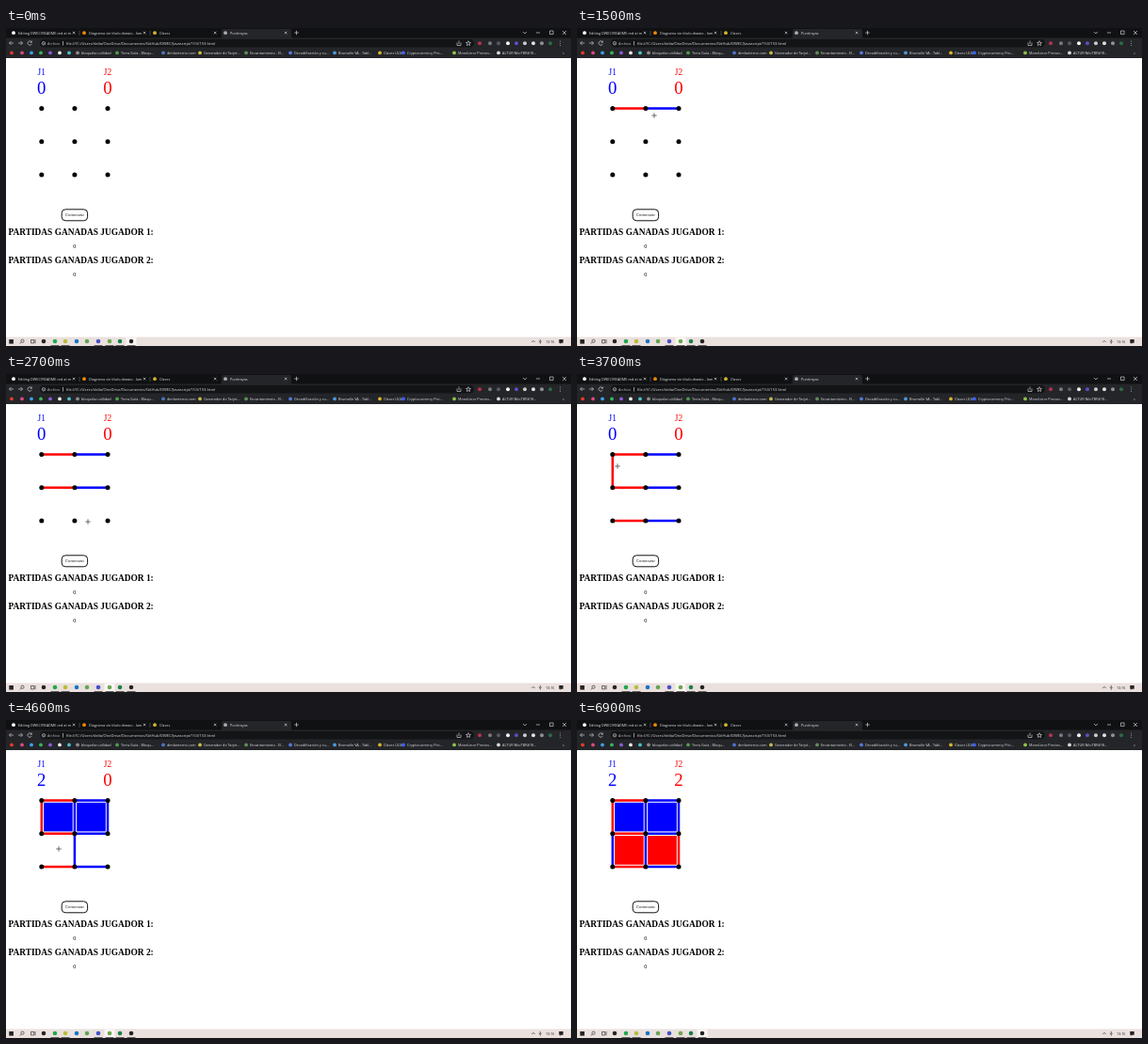
Write an HTML page that moves like this. It is 600 px wide and 338 px high and loops after 7000 ms.

```html
<!DOCTYPE html>
<html lang="es">
<head>
<meta charset="utf-8">
<title>Puntirayas</title>
<style>
  html, body { margin: 0; width: 100%; height: 100%; overflow: hidden; background: #fff; }
  svg { display: block; width: 100vw; height: 100vh; }
  .ui { font-family: "Open Sans", "Noto Sans", sans-serif; font-size: 3.8px; fill: #dfe1e4; }
  .page { font-family: "Liberation Serif", "Times New Roman", serif; font-size: 6.25px; text-anchor: middle; }
  .page .head { font-size: 9.375px; font-weight: bold; text-anchor: start; }
  .page .name { font-size: 9.375px; }
  .page .score { font-size: 18.75px; }
  .button { font: 4.4px "Liberation Sans", Arial, sans-serif; fill: #222; }
  .icon { fill: none; stroke: #c9cbcf; stroke-width: .7; }
  .dark { fill: none; stroke: #333; stroke-width: .7; }
  .blue { fill: #00f; }
  .red { fill: #f00; }
  #cursor { mix-blend-mode: difference; stroke: #fff; stroke-width: .9; opacity: .65; }
</style>
</head>
<body>
<svg viewBox="0 0 600 338" preserveAspectRatio="none">
  <rect width="600" height="338" fill="#fff"/>

  <g class="ui">
    <rect width="600" height="11" fill="#101113"/>
    <rect y="10.5" width="600" height="21.5" fill="#242528"/>
    <path d="M227 11q2 0 2-2V3q0-2 2-2h70q2 0 2 2v6q0 2 2 2z" fill="#242528"/>
    <rect x="36" y="12" width="461" height="8.6" rx="4.3" fill="#131416"/>
    <g id="tabs"></g>
    <path class="icon" d="M78 3v5M153 3v5" opacity=".4"/>
    <path class="icon" d="M306.300 5h4.400M308.500 2.800v4.400M549 4l2 2 2-2M563 5h4M577.500 3h3.600v3.600h-3.600zM591 3l4 4M595 3l-4 4"/>
    <path class="icon" d="M8 16H3.500M5.500 14l-2 2 2 2M13 16h4.500M15.500 14l2 2-2 2M27 14.700a2.200 2.200 0 1 0 .3 2.200M27.300 13.500v1.800h-1.800"/>
    <circle class="icon" cx="40" cy="16.300" r="1.700"/>
    <path class="icon" d="M40 16v1.200M60.500 14v4.500"/>
    <text x="44" y="17.800" fill="#bbb">Archivo</text>
    <text x="64" y="17.800" font-size="4.100">file:///C:/Users/delia/OneDrive/Documentos/GitHub/DWEC/Javascript/153/153.html</text>
    <path class="icon" d="M479 15.500v3h4v-3M481 17v-3.500M491 13.700l.7 1.700 1.800.1-1.400 1.200.5 1.800-1.600-1-1.600 1 .5-1.800-1.400-1.200 1.800-.1z"/>
    <g id="tools"></g>
    <path class="icon" d="M588.500 13.600v.9M588.500 15.800v.9M588.500 18v.9"/>
    <g id="marks"></g>
    <text x="591" y="28">»</text>
  </g>

  <g class="page">
    <text class="name blue" x="37.700" y="50">J1</text>
    <text class="name red" x="108" y="50">J2</text>
    <text class="score blue" id="score1" x="37.700" y="70.300">0</text>
    <text class="score red" id="score2" x="108" y="70.300">0</text>
    <g id="boxes"></g>
    <g id="lines" stroke-width="2.500"></g>
    <g id="dots"></g>
    <rect x="59.200" y="192.800" width="27.400" height="12" rx="4" fill="#fff" stroke="#111" stroke-width="1"/>
    <text class="button" x="72.900" y="200.400">Comenzar</text>
    <text class="head" x="2.500" y="219.800">PARTIDAS GANADAS JUGADOR 1:</text>
    <text x="72.800" y="233.900">0</text>
    <text class="head" x="2.500" y="250.200">PARTIDAS GANADAS JUGADOR 2:</text>
    <text x="72.800" y="264.200">0</text>
  </g>

  <g class="ui">
    <rect y="328.500" width="600" height="9.500" fill="#eae0dd"/>
    <rect id="active" y="328.500" width="11" height="9.500" fill="#faf5f3"/>
    <rect x="3.300" y="331" width="4.600" height="4.600" fill="#222"/>
    <circle class="dark" cx="17.500" cy="332.700" r="1.600"/>
    <path class="dark" d="M16.300 333.900l-1.500 1.600M26.500 331.500h3.200v3.400h-3.200zM31 331v4.300"/>
    <g id="dock"></g>
    <path class="dark" d="M558.300 334l1.700-1.700 1.700 1.700M567.300 331v2.800M565.800 333q1.500 2.400 3 0M567.300 334.500v1.200"/>
    <text x="573" y="334.700" style="fill:#222;font-size:3.700px">13:16</text>
    <path d="M587.300 331h4.400v3.700h-2l-1.200 1.200v-1.200h-1.200z" fill="#222"/>
  </g>

  <path id="cursor" d="M-2.700 0h5.400M0-2.700v5.400"/>
</svg>

<script>
const LOOP = 7000, STEP = 100;
const X = [37.8, 72.9, 108], Y = [85.5, 120.8, 156];
const BLUE = '#00f', RED = '#f00';
const $ = id => document.getElementById(id);
const fill = (id, items, draw) => { $(id).innerHTML = items.map(draw).join(''); };
const spot = (x, y, color, r = 1.9) => `<circle cx="${x}" cy="${y}" r="${r}" fill="${color}"/>`;
const label = (x, y, text) => `<text x="${x}" y="${y}">${text}</text>`;

fill('tabs', [
  [8, 'Editing DWEC/README.md at m', '#fff'],
  [83, 'Diagrama sin título.drawio - lam', '#f08705'],
  [158, 'Clases', '#d5b52c'],
  [233, 'Puntirayas', '#aaadb2']
], ([x, text, color]) => spot(x, 5.2, color) + label(x + 5, 6.6, text) +
  `<path class="icon" d="M${x + 62.8} 3.800l2.600 2.600m0-2.600l-2.600 2.600"/>`);

fill('tools', [
  [503, '#b8324a'], [514, '#77797e'], [523, '#555a66'], [533, '#f4f4f4'],
  [542, '#5a4fc4'], [551, '#c9cbcf'], [560, '#e0e0e0'], [569, '#8d9094'], [578, '#2c6b45']
], ([x, color]) => spot(x, 16.2, color, 2));

fill('marks', [
  [6, '', '#e23b30'], [17, '', '#d64a83'], [27, '', '#3a9ff0'], [37, '', '#36b45c'],
  [47, '', '#8a5bd8'], [57, '', '#e8e8e8'], [67, '', '#4ac0c8'],
  [76, 'bloquelar-utilidad', '#8c8c8c'],
  [118, 'Terra Guía - Bloqu...', '#4d9b4a'],
  [167, 'dimlanterno.com', '#4b74c9'],
  [206, 'Generador de Tarjet...', '#c8b84c'],
  [255, 'Encantamiento - El...', '#5d8f58'],
  [302, 'Decodificación y cu...', '#5577dd'],
  [349, 'Brumalín VA - Tabl...', '#4c98dd'],
  [397, 'Clases ULM', '#d5b52c'],
  [422, 'Cryptocurrency Pric...', '#3861fb'],
  [476, 'MoneLince Precios...', '#8bc34a'],
  [523, 'ALTUR NiloTBR#18...', '#d8d8d8']
], ([x, text, color]) => spot(x, 26.4, color) + label(x + 4, 27.9, text));

fill('dock', [
  [40, '#252525'], [52, '#1fa84f', 1], [63, '#b8bd37', 1], [75, '#1675c4'], [86, '#62a552'],
  [98, '#4451c5', 1], [110, '#68a84f', 1], [121, '#18804a', 1], [133, '#222', 1]
], ([x, color, open]) => spot(x, 333, color, 2.3) +
  (open ? `<path d="M${x - 4.5} 337.500h9" stroke="#555" stroke-width=".9"/>` : ''));

fill('dots', X.flatMap(x => Y.map(y => [x, y])), ([x, y]) => spot(x, y, '#000', 2.5));

// Moves: time, column, row, direction, colour
const moves = [
  [900, 0, 0, 'h', RED], [1300, 1, 0, 'h', BLUE],
  [1900, 0, 1, 'h', RED], [2300, 1, 1, 'h', BLUE],
  [2900, 0, 2, 'h', RED], [3200, 1, 2, 'h', BLUE],
  [3600, 0, 0, 'v', RED], [4000, 1, 0, 'v', BLUE],
  [4200, 2, 0, 'v', BLUE], [4400, 1, 1, 'v', BLUE],
  [5000, 0, 1, 'v', BLUE], [5300, 2, 1, 'v', RED]
];
fill('lines', moves, ([at, c, r, dir, color]) =>
  `<path data-at="${at}" d="M${X[c]} ${Y[r]}${dir}35.200" stroke="${color}"/>`);

// Boxes: time, column, row, colour
const boxes = [[4000, 0, 0, BLUE], [4200, 1, 0, BLUE], [5000, 0, 1, RED], [5300, 1, 1, RED]];
fill('boxes', boxes, ([at, c, r, color]) =>
  `<rect data-at="${at}" x="${X[c] + 2.3}" y="${Y[r] + 2.3}" width="30.600" height="30.600" fill="${color}"/>`);

// Pointer path: time, x, y
const path = [
  [100, 118, 250], [400, 74, 200], [500, 74, 199], [900, 56, 88], [1000, 56, 88],
  [1300, 88, 87], [1500, 82, 93], [1900, 56, 122], [2000, 56, 122], [2300, 90, 122],
  [2700, 87, 157], [2900, 56, 156], [3000, 56, 156], [3200, 90, 156], [3500, 39, 104],
  [3700, 43, 98], [4000, 73, 103], [4200, 107, 104], [4400, 73, 138], [4600, 56, 137],
  [4900, 40, 138], [5000, 40, 138], [5300, 106, 138], [5400, 98, 139.500],
  [5600, 98, 139.500], [6200, 265, 65], [LOOP, 265, 65]
];

function pointAt(t) {
  const i = Math.max(1, path.findIndex(p => p[0] > t));
  const [t0, x0, y0] = path[i - 1], [t1, x1, y1] = path[i];
  const u = Math.max(0, (t - t0) / (t1 - t0));
  const e = u * u * (3 - 2 * u);
  return [x0 + (x1 - x0) * e, y0 + (y1 - y0) * e];
}

const timed = [...document.querySelectorAll('[data-at]')];
const count = (t, color) => boxes.filter(b => b[3] === color && b[0] <= t).length;
const start = performance.now();

function draw(now) {
  const t = Math.floor(Math.max(0, now - start) % LOOP / STEP) * STEP;
  const idle = t < 100 || t >= 6900;
  for (const el of timed) el.style.visibility = t >= +el.dataset.at ? 'visible' : 'hidden';
  $('score1').textContent = count(t, BLUE);
  $('score2').textContent = count(t, RED);
  $('active').setAttribute('x', idle ? 127.5 : 104.5);
  $('cursor').style.visibility = idle ? 'hidden' : 'visible';
  $('cursor').setAttribute('transform', `translate(${pointAt(t)})`);
  requestAnimationFrame(draw);
}
draw(start);
</script>
</body>
</html>
```
